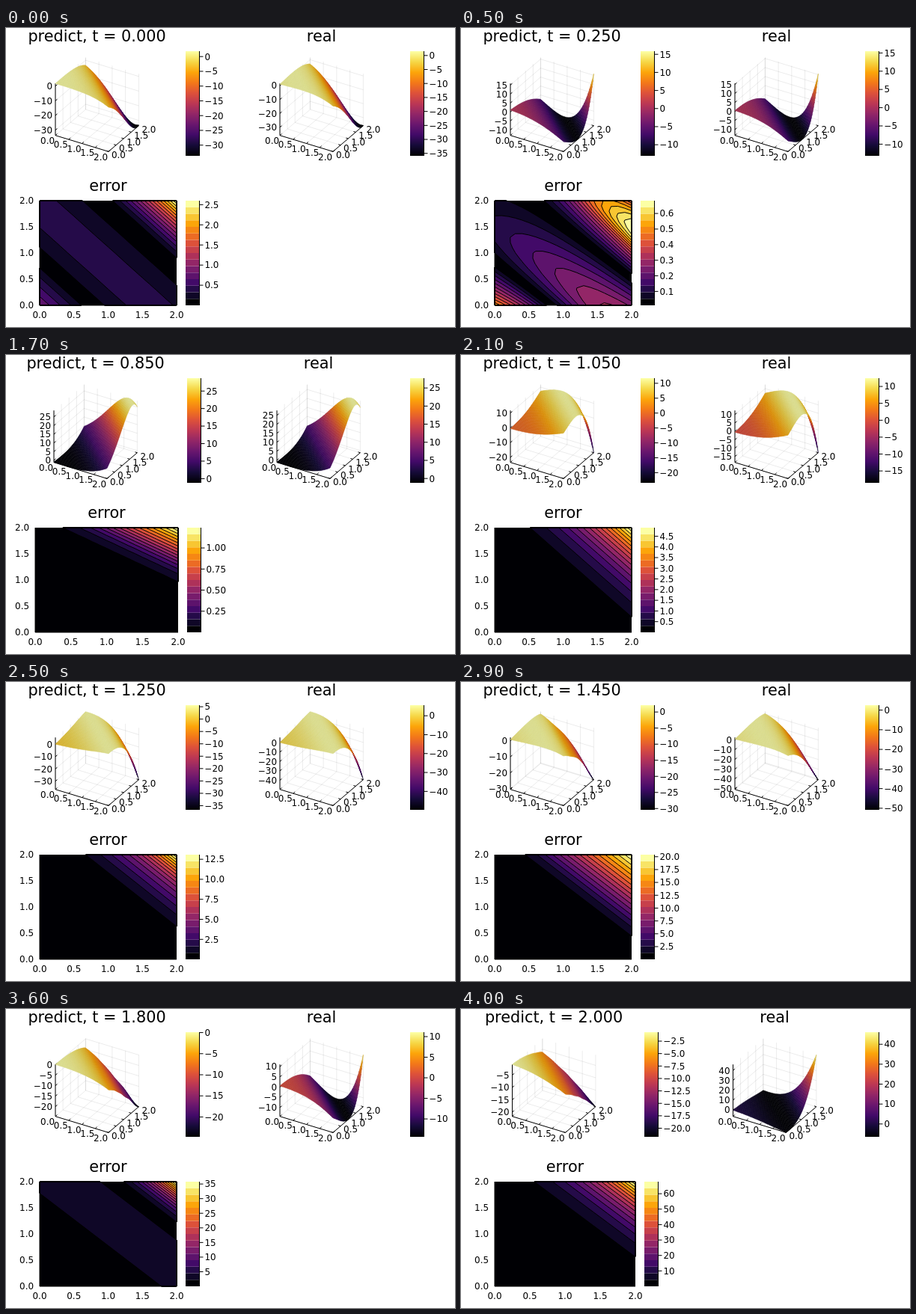
Animation of 600x400 px, one loop 4100 ms. Source, as an HTML page with a canvas:

```html
<!DOCTYPE html>
<html lang="en">
<head>
<meta charset="utf-8">
<title>Surface prediction</title>
<style>
html, body { margin: 0; width: 600px; height: 400px; overflow: hidden; background: #fff; }
canvas { display: block; }
</style>
</head>
<body>
<canvas id="stage" width="600" height="400"></canvas>
<script>
const ctx = document.getElementById('stage').getContext('2d');
const STEP_MS = 100, STEPS = 41, BANDS = 16;
const FONT = '"DejaVu Sans", sans-serif';
const TICK_FONT = `11.9px ${FONT}`, TITLE_FONT = `20.8px ${FONT}`;
const AXIS = [0, 0.5, 1, 1.5, 2];

// Inferno colour map, evenly spaced stops.
const STOPS = ['000004', '160b39', '420a68', '6a176e', '932667', 'bc3754',
  'dd513a', 'f37819', 'fca50a', 'f6d746', 'fcffa4']
  .map(hex => [0, 2, 4].map(i => parseInt(hex.slice(i, i + 2), 16)));

function inferno(v, shade = 1) {
  const p = Math.min(Math.max(v, 0), 1) * (STOPS.length - 1);
  const i = Math.min(Math.floor(p), STOPS.length - 2);
  const rgb = STOPS[i].map((c, k) => Math.round((c + (STOPS[i + 1][k] - c) * (p - i)) * shade));
  return `rgb(${rgb})`;
}

// Deviation of the prediction at x + y = 0, 0.5 ... 4, then its gain and tilt across x - y.
const DEVIATION = [
  { t: 0,    row: [0.8, 0.32, -0.15, -0.36, -0.35, -0.17, 0.17, 1.15, 2.6, 0, -0.08] },
  { t: 0.5,  row: [0.25, 0.1, -0.02, -0.07, 0, 0.1, 0.31, 0.2, -1.11, 0.5, 0.07] },
  { t: 0.85, row: [0.02, 0.01, 0, 0, 0, 0.02, 0.2, 0.7, 1.24, 0, 0.22] },
  { t: 1.05, row: [0, 0, 0, 0.05, -0.02, -0.4, -1.2, -2.7, -4.9, 0, -0.07] },
  { t: 1.15, row: [-0.05, -0.05, -0.1, -0.1, 0, 0, -0.2, 1, 6, 0, -0.03] },
  { t: 1.45, row: [-0.1, -0.2, -0.35, -0.35, 0.2, 1.6, 7, 13.8, 20.4, 0, 0] },
  { t: 1.65, row: [-0.3, -0.35, -0.1, 0.75, 2.3, 4.8, 6.7, 6.1, -5.9, 0, 0] },
  { t: 1.85, row: [-0.56, -0.27, 0.35, 1.45, 2.7, 2.7, -1.6, -15, -45.4, 0, 0] },
  { t: 2,    row: [-0.55, -0.2, 0.2, 0.5, 0, -3.4, -12.8, -33, -67.8, 0, 0] }
];

function hermite(a, b, ma, mb, u) {
  const u2 = u * u, u3 = u2 * u;
  return (2 * u3 - 3 * u2 + 1) * a + (u3 - 2 * u2 + u) * ma
    + (3 * u2 - 2 * u3) * b + (u3 - u2) * mb;
}

function deviationRow(t) {
  const last = DEVIATION.length - 1;
  let i = 0;
  while (i < last - 1 && t > DEVIATION[i + 1].t) i++;
  const a = DEVIATION[i], b = DEVIATION[i + 1], span = b.t - a.t;
  const slope = (k, n) => {
    const p = DEVIATION[Math.max(n - 1, 0)], q = DEVIATION[Math.min(n + 1, last)];
    return (q.row[k] - p.row[k]) / (q.t - p.t) * span;
  };
  return a.row.map((v, k) => hermite(v, b.row[k], slope(k, i), slope(k, i + 1), (t - a.t) / span));
}

function makeFields(t) {
  const row = deviationRow(t), [gain, tilt] = row.slice(9);
  const node = i => i < 0 ? 3 * row[0] - 3 * row[1] + row[2]
    : i > 8 ? 3 * row[8] - 3 * row[7] + row[6] : row[i];
  const real = (x, y) => Math.exp(x + y) * Math.cos(x + y + 4 * t);
  const deviation = (x, y) => {
    const p = (x + y + tilt * (y - x)) * 2;
    const i = Math.min(Math.max(Math.floor(p), 0), 7);
    const a = node(i), b = node(i + 1);
    return hermite(a, b, (b - node(i - 1)) / 2, (node(i + 2) - a) / 2, p - i) * (1 + gain * (x - y));
  };
  return {
    real,
    predict: (x, y) => real(x, y) + deviation(x, y),
    error: (x, y) => Math.abs(deviation(x, y))
  };
}

function sample(f, n) {
  const z = [];
  let lo = Infinity, hi = -Infinity;
  for (let j = 0; j <= n; j++) {
    z.push([]);
    for (let i = 0; i <= n; i++) {
      const v = f(2 * i / n, 2 * j / n);
      z[j].push(v);
      lo = Math.min(lo, v);
      hi = Math.max(hi, v);
    }
  }
  return { z, n, lo, hi };
}

// Finest round step that gives at most `most` ticks.
function makeTicks(lo, hi, most) {
  for (let power = -3; power < 4; power++) {
    for (const base of [1, 2.5, 5]) {
      const step = base * 10 ** power;
      const from = Math.ceil(lo / step + 1e-6), to = Math.floor(hi / step);
      if (to - from + 1 > most) continue;
      const digits = Math.max(0, (base === 2.5 ? 1 : 0) - power);
      const ticks = [];
      for (let i = from; i <= to; i++) {
        const v = i * step;
        ticks.push({ v, label: (i < 0 ? '\u2212' : '') + Math.abs(v).toFixed(digits) });
      }
      return ticks;
    }
  }
  return [];
}

function text(str, x, y, align = 'center', font = TICK_FONT) {
  ctx.font = font;
  ctx.textAlign = align;
  ctx.textBaseline = 'alphabetic';
  ctx.fillStyle = '#000';
  ctx.fillText(str, x, y + (font === TICK_FONT ? 4.3 : 0));
}

function lines(segments, color = '#000', width = 1) {
  ctx.strokeStyle = color;
  ctx.lineWidth = width;
  ctx.beginPath();
  for (const [a, b] of segments) {
    ctx.moveTo(a[0], a[1]);
    ctx.lineTo(b[0], b[1]);
  }
  ctx.stroke();
}

function colorBar(x, top, { lo, hi }, banded) {
  const height = 140, width = 18;
  const count = banded ? BANDS : height;
  for (let i = 0; i < count; i++) {
    ctx.fillStyle = inferno(i / (count - 1));
    ctx.fillRect(x, top + height * (1 - (i + 1) / count), width, height / count);
  }
  const right = x + width + 0.5;
  const segments = [[[right, top], [right, top + height]]];
  for (const { v, label } of makeTicks(lo, hi, 9)) {
    const y = top + height * (1 - (v - lo) / (hi - lo));
    segments.push([[right, y], [right + 5, y]]);
    text(label, right + 7, y, 'left');
  }
  lines(segments);
}

function drawSurface(center, grid, ticks, title) {
  const { z, n, lo, hi } = grid;
  const left = center - 55.5;
  const at = (x, y, h) => [left + 35.5 * x + 20.2 * y,
    143.7 + 10.8 * x - 17.3 * y - 69.5 * (h - lo) / (hi - lo)];

  const mesh = [];
  for (const v of AXIS) {
    mesh.push([at(v, 0, lo), at(v, 2, lo)], [at(0, v, lo), at(2, v, lo)],
      [at(0, v, lo), at(0, v, hi)], [at(v, 2, lo), at(v, 2, hi)]);
  }
  for (const { v } of ticks) mesh.push([at(0, 0, v), at(0, 2, v)], [at(0, 2, v), at(2, 2, v)]);
  lines(mesh, 'rgba(0,0,0,0.08)');

  const axes = [[at(0, 0, lo), at(0, 0, hi)], [at(0, 0, lo), at(2, 0, lo)], [at(2, 0, lo), at(2, 2, lo)]];
  for (const v of AXIS) axes.push([at(v, 0, lo), at(v, 0.12, lo)], [at(2, v, lo), at(1.92, v, lo)]);
  for (const { v } of ticks) axes.push([at(0, 0, v), at(0, 0.12, v)]);
  lines(axes);

  // Far corner first.
  const d = 2 / n;
  ctx.lineWidth = 0.5;
  for (let j = n - 1; j >= 0; j--) {
    for (let i = 0; i < n; i++) {
      const corners = [[i, j], [i + 1, j], [i + 1, j + 1], [i, j + 1]];
      const mean = corners.reduce((sum, [a, b]) => sum + z[b][a], 0) / 4;
      ctx.fillStyle = ctx.strokeStyle = inferno((mean - lo) / (hi - lo), 0.86);
      ctx.beginPath();
      for (const [a, b] of corners) ctx.lineTo(...at(a * d, b * d, z[b][a]));
      ctx.closePath();
      ctx.fill();
      ctx.stroke();
    }
  }

  for (const v of AXIS) {
    const [ax, ay] = at(v, 0, lo), [bx, by] = at(2, v, lo);
    text(v.toFixed(1), ax - 1, ay + 7, 'right');
    text(v.toFixed(1), bx + 4, by + 4.5, 'left');
  }
  for (const { v, label } of ticks) text(label, left - 4, at(0, 0, v)[1], 'right');
  text(title, center, 18, 'center', TITLE_FONT);
}

// Part of a cell that lies above a level; `cut` receives the crossing points.
function clipCell(cell, level, cut) {
  const out = [];
  cell.forEach((p, i) => {
    const q = cell[(i + 1) % cell.length];
    if (p[2] >= level) out.push(p);
    if ((p[2] >= level) !== (q[2] >= level)) {
      const u = (level - p[2]) / (q[2] - p[2]);
      const c = [p[0] + (q[0] - p[0]) * u, p[1] + (q[1] - p[1]) * u];
      out.push(c);
      cut.push(c);
    }
  });
  return out;
}

function drawContours(left, width, { z, n, lo, hi }) {
  const top = 231, height = 140, right = left + width, bottom = top + height;
  const point = (i, j) => [left + width * i / n, top + height * (1 - j / n), z[j][i]];
  const onBorder = (p, q) =>
    [left, right].some(x => Math.abs(p[0] - x) + Math.abs(q[0] - x) < 0.01) ||
    [top, bottom].some(y => Math.abs(p[1] - y) + Math.abs(q[1] - y) < 0.01);
  const cells = [];
  for (let j = 0; j < n; j++) {
    for (let i = 0; i < n; i++) {
      cells.push([point(i, j), point(i + 1, j), point(i + 1, j + 1), point(i, j + 1)]);
    }
  }
  ctx.fillStyle = inferno(0);
  ctx.fillRect(left, top, width, height);
  const contours = [], outline = [];
  for (let band = 1; band < BANDS; band++) {
    const level = lo + (hi - lo) * band / BANDS;
    ctx.fillStyle = inferno(band / (BANDS - 1));
    ctx.beginPath();
    for (const cell of cells) {
      const cut = [], shape = clipCell(cell, level, cut);
      if (!shape.length) continue;
      shape.forEach((p, i) => {
        if (i) ctx.lineTo(p[0], p[1]);
        else ctx.moveTo(p[0], p[1]);
        const q = shape[(i + 1) % shape.length];
        if (band === 1 && onBorder(p, q)) outline.push([p, q]);
      });
      ctx.closePath();
      for (let i = 0; i + 1 < cut.length; i += 2) contours.push([cut[i], cut[i + 1]]);
    }
    ctx.fill();
  }
  lines(contours);
  // The border is inked only where the lowest contour closes along it.
  lines(outline, '#000', 2);
  lines([[[left, top], [left, bottom]], [[left, bottom], [right, bottom]]]);
  for (const v of AXIS) {
    text(v.toFixed(1), left + width * v / 2, 383.5);
    text(v.toFixed(1), left - 8, top + height * (1 - v / 2), 'right');
  }
  text('error', left + width / 2, 218, 'center', TITLE_FONT);
}

function labelWidth(ticks) {
  ctx.font = TICK_FONT;
  return Math.max(...ticks.map(({ label }) => ctx.measureText(label).width));
}

function draw(t) {
  const fields = makeFields(t);
  const predict = sample(fields.predict, 40);
  const real = sample(fields.real, 40);
  const error = sample(fields.error, 20);
  const predictTicks = makeTicks(predict.lo, predict.hi, 6);
  const realTicks = makeTicks(real.lo, real.hi, 6);

  // Column margins follow the widest height label.
  const left1 = Math.round(Math.max(39, labelWidth(predictTicks) + 19.5));
  const pad2 = labelWidth(realTicks) + 22.2;
  const width = Math.round((600 - 142 - left1 - pad2) / 2);
  const left2 = 600 - 72 - width;
  const bar1 = left1 + width + 12, bar2 = left2 + width + 12;

  ctx.fillStyle = '#fff';
  ctx.fillRect(0, 0, 600, 400);
  drawSurface(left1 + width / 2 - 15, predict, predictTicks, `predict, t = ${t.toFixed(3)}`);
  drawSurface(left2 + width / 2 - 15, real, realTicks, 'real');
  drawContours(left1, width, error);
  colorBar(bar1, 31, predict, false);
  colorBar(bar2, 31, real, false);
  colorBar(bar1, 231, error, true);
}

const start = performance.now();
let shown = -1;
function tick() {
  const step = Math.floor((performance.now() - start) / STEP_MS) % STEPS;
  if (step !== shown) {
    shown = step;
    draw(step * 0.05);
  }
  requestAnimationFrame(tick);
}
tick();
</script>
</body>
</html>
```
